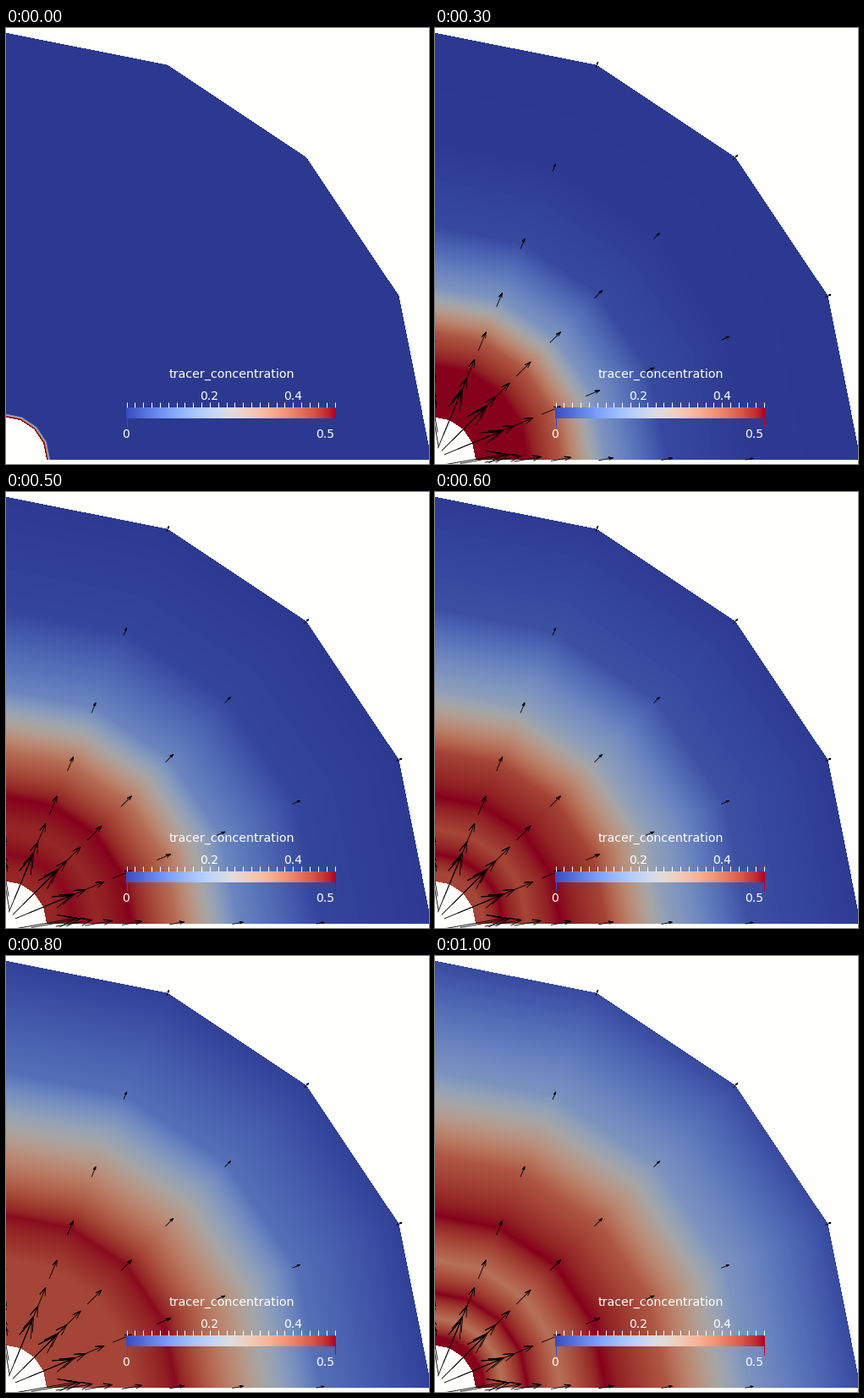
A matplotlib script that plays this animation: 500 px wide and 516 px high, repeating every 1100 ms.

```python
import numpy as np
import matplotlib.pyplot as plt
from matplotlib.animation import FuncAnimation
from matplotlib.collections import LineCollection

W, H, DPI = 500, 516, 100
FRAMES, STEP = 11, 100
CX, CY, FLOOR = -2, 510.3, 511
R_IN, R_OUT = 50, 505
SECTOR = np.pi / 8
BACKGROUND = np.array([254, 254, 251]) / 255
SHADE = 0.75
V_MAX = 0.5
PX = 72 / DPI

# Mesh rings grow geometrically from the hole to the outer rim.
RINGS = np.append(R_IN, R_OUT / 1.353 ** np.arange(7, -1, -1))

cmap = plt.get_cmap("coolwarm", 256)

# Distance measured so that every ring of the 16-sided mesh is a level set.
px, py = np.meshgrid(np.arange(W) + 0.5, np.arange(H) + 0.5)
gx, gy = px - CX, CY - py
angle = np.arctan2(gy, gx) % SECTOR - SECTOR / 2
rho = np.hypot(gx, gy) * np.cos(angle) / np.cos(SECTOR / 2)
inside = (rho >= R_IN) & (rho <= R_OUT) & (py < FLOOR)


def ring_values(step):
    """Front spreading with the square root of time, ripples in its wake."""
    front = 105 * np.sqrt(step)
    values = np.minimum(V_MAX, 0.53 / (1 + (RINGS / front) ** 7))
    depth = 0.03 * np.clip(step - 4, 0, 4)
    crest = 4 + (step - 6) / 4
    ring = np.maximum(np.arange(len(RINGS)), 1)
    ripple = depth * (1 - np.cos(np.pi * (ring - crest))) / 2
    return values - np.where(RINGS < 0.63 * front, ripple, 0)


def concentration(step):
    if step == 0:
        return np.interp(rho, [R_IN + 1, R_IN + 4.5], [V_MAX, 0])
    return np.interp(rho, RINGS, ring_values(step))


def field_image(step):
    lit = cmap(concentration(step) / V_MAX)[..., :3] * SHADE
    return np.where(inside[..., None], lit, BACKGROUND)


def arrow(x, y, length, heading):
    """Centred open arrow as one polyline."""
    pts = length * np.array([[-.5, 0], [.5, 0], [.2, .1], [.5, 0], [.2, -.1]])
    c, s = np.cos(heading), np.sin(heading)
    return np.column_stack([x + pts[:, 0] * c - pts[:, 1] * s,
                            y - pts[:, 0] * s - pts[:, 1] * c])


def velocity_arrows():
    arrows = []
    for k in range(5):
        theta = k * SECTOR
        tilt = np.radians(10) if k in (0, 4) else 0
        for r in RINGS:
            x, y = CX + r * np.cos(theta), CY - r * np.sin(theta)
            arrows.append(arrow(x, y, 3600 / r, theta + tilt))
    return arrows


def draw_scalar_bar(ax):
    x0, x1, top, bottom = 142, 389, 449, 462
    ax.imshow(np.linspace(0, 1, 256)[None], cmap=cmap, aspect="auto",
              extent=(x0, x1, bottom, top), zorder=4)
    ticks = np.linspace(x0 + 0.5, x1 - 0.5, 26)
    ax.vlines(ticks, 443, top, color="white", lw=PX, zorder=5)
    for x, value in ((x0 + 0.5, 0.0), (x1 - 0.5, 1.0)):
        ax.vlines(x, top, 472, color=cmap(value), lw=PX, zorder=5)

    def label(x, y, text, size=14, ha="center"):
        ax.text(x, y, text, ha=ha, va="baseline", color="white",
                family="DejaVu Sans", size=size * PX, zorder=6)

    label(266.5, 413.5, "tracer_concentration", size=14.2)
    label(240.5, 440, "0.2")
    label(339, 440, "0.4")
    label(142, 485, "0")
    label(388.5, 485, "0.5", ha="right")


fig = plt.figure(figsize=(W / DPI, H / DPI), dpi=DPI)
ax = fig.add_axes([0, 0, 1, 1])
ax.axis("off")

field = ax.imshow(field_image(0), extent=(0, W, H, 0), aspect="auto",
                  interpolation="nearest", zorder=1)
glyphs = LineCollection(velocity_arrows(), colors="black",
                        linewidths=0.85 * PX, zorder=3)
ax.add_collection(glyphs)
draw_scalar_bar(ax)
ax.set_xlim(0, W)
ax.set_ylim(H, 0)


def update(step):
    field.set_data(field_image(step))
    glyphs.set_visible(step > 0)
    return field, glyphs


anim = FuncAnimation(fig, update, frames=FRAMES, interval=STEP,
                     repeat=True, repeat_delay=0, blit=False)
plt.show()
```
